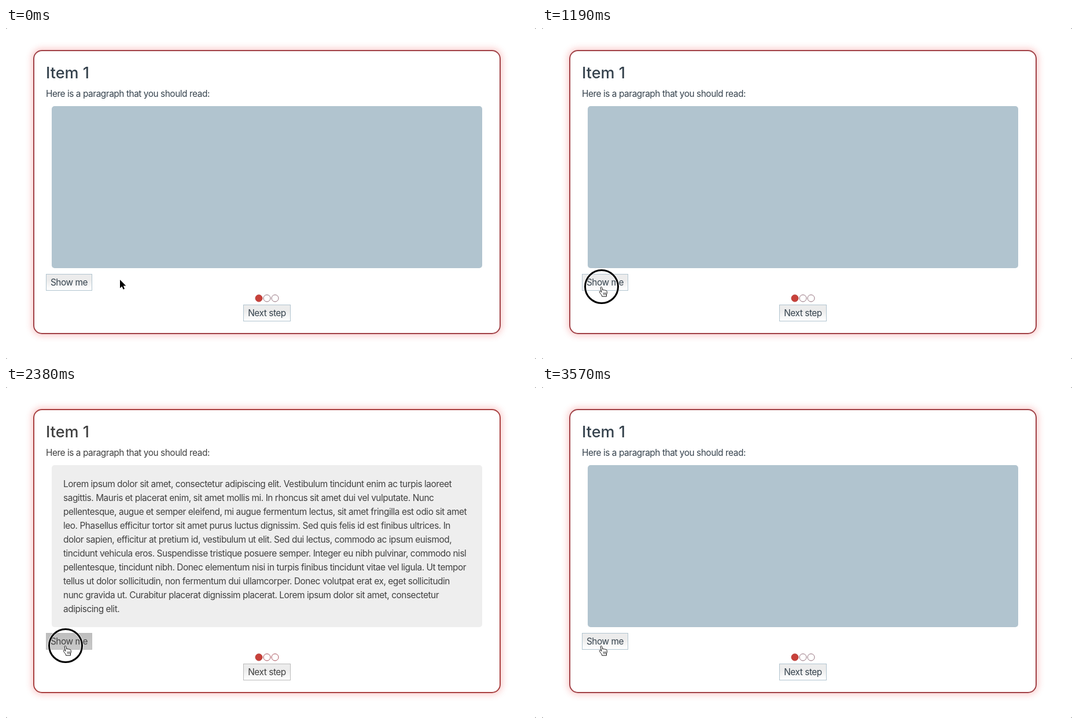
An HTML page that plays this animation: 916x572 px, repeating every 4.06 s.

```html
<!DOCTYPE html>
<html lang="en">
<head>
<meta charset="utf-8">
<title>Show me</title>
<style>
html, body { margin: 0; width: 100%; height: 100%; overflow: hidden; background: #fff; }
#stage {
  --ink: #35424d; --line: #b1c4cf; --edge: #a14146; --ring: #93707c; --panel: #b1c4cf;
  position: relative; width: 916px; height: 572px; overflow: hidden; background: #fff;
  font: 400 15.4px/24px Inter, Roboto, sans-serif; letter-spacing: -.445px; color: var(--ink);
}
#stage.open { --ink: #404040; --line: #bbb; --edge: #a94040; --ring: #a9505a; --panel: #eee; }
#stage > * { position: absolute; box-sizing: border-box; margin: 0; white-space: nowrap; }
.card {
  left: 47px; top: 38px; width: 808px; height: 491px; border: 2px solid var(--edge);
  border-radius: 15px; box-shadow: 0 0 11px 3px rgba(240, 60, 60, .25);
}
h3 { left: 69px; top: 61px; font-size: 27px; font-weight: 500; line-height: 34px; letter-spacing: 0; }
.intro { left: 69px; top: 102px; }
.panel {
  left: 79px; top: 135px; width: 744px; height: 280px; padding: 21px 20px;
  border-radius: 5px; background: var(--panel);
}
.panel span { visibility: hidden; white-space: pre; }
.open .panel span { visibility: visible; }
.button {
  height: 29px; line-height: 27px; text-align: center; border: 1px solid var(--line);
  background: linear-gradient(#ececec 35%, #fff);
}
.show { left: 69px; top: 425px; width: 80px; }
.open .show { background: linear-gradient(#bebebe, #c9c9c9); }
.next { left: 410px; top: 478px; width: 82px; }
svg { left: 0; top: 0; }
.dots circle { fill: #fff; stroke: var(--ring); }
.dots circle:first-child { fill: #c8413a; stroke: #b8403c; }
</style>
</head>
<body>
<div id="stage">
  <div class="card"></div>
  <h3>Item 1</h3>
  <p class="intro">Here is a paragraph that you should read:</p>
  <div class="panel"><span>Lorem ipsum dolor sit amet, consectetur adipiscing elit. Vestibulum tincidunt enim ac turpis laoreet
sagittis. Mauris et placerat enim, sit amet mollis mi. In rhoncus sit amet dui vel vulputate. Nunc
pellentesque, augue et semper eleifend, mi augue fermentum lectus, sit amet fringilla est odio sit amet
leo. Phasellus efficitur tortor sit amet purus luctus dignissim. Sed quis felis id est finibus ultrices. In
dolor sapien, efficitur at pretium id, vestibulum ut elit. Sed dui lectus, commodo ac ipsum euismod,
tincidunt vehicula eros. Suspendisse tristique posuere semper. Integer eu nibh pulvinar, commodo nisl
pellentesque, tincidunt nibh. Donec elementum nisi in turpis finibus tincidunt vitae vel ligula. Ut tempor
tellus ut dolor sollicitudin, non fermentum dui ullamcorper. Donec volutpat erat ex, eget sollicitudin
nunc gravida ut. Curabitur placerat dignissim placerat. Lorem ipsum dolor sit amet, consectetur
adipiscing elit.</span></div>
  <div class="button show">Show me</div>
  <div class="button next">Next step</div>
  <svg width="916" height="572" fill="none">
    <path d="M0 0H2L0 2ZM916 0H914L916 2ZM0 572H2L0 570ZM916 572H914L916 570Z" fill="#999"/>
    <g class="dots">
      <circle cx="437" cy="467" r="6"/>
      <circle cx="451" cy="467" r="6"/>
      <circle cx="465" cy="467" r="6"/>
    </g>
    <g id="click">
      <circle cx="103" cy="447" r="28.5" stroke="#fff" stroke-width="4.6"/>
      <circle cx="103" cy="447" r="28.5" stroke="#000" stroke-width="3"/>
    </g>
    <path id="arrow" d="M0 0V14.5L3.4 11.4L5.7 16.8L8 15.8L5.7 10.6H10.3Z"
      fill="#000" stroke="#fff" stroke-width="1.4" paint-order="stroke"/>
    <g id="hand" stroke="#111" stroke-linejoin="round" stroke-linecap="round">
      <path fill="#fff" d="M4.6 16.5C4.4 14.4 2.7 13 1.2 10.8C.2 9.3 0 8.3 .8 7.8
        C1.8 7.2 2.9 8.3 3.9 9.5L2.4 3C2 1.4 2.3 .6 3.1 .5C4 .3 4.6 1 4.9 2.2L5.9 6.2
        C6.1 5 8 5 8.4 6.4C8.9 5.4 10.4 5.6 10.9 6.9C11.6 6.2 12.9 6.6 13.2 8.2
        C13.7 10.5 13.3 12.4 12.4 14L12.5 16.5Z"/>
      <path stroke-width=".8" d="M7.1 10.6L7.6 13.8M9.2 10.5L9.5 13.8M11.2 10.4L11.3 13.8"/>
    </g>
  </svg>
</div>
<script>
const LOOP = 4060, STEP = 70;
const PRESS = 1120, OPEN = 1260, CLOSE = 3430, HAND = 770;

// Pointer tip, one point per step from zero
const path = [
  [197, 435], [194, 436], [186, 440], [174, 447], [160, 455], [145, 462], [129, 467],
  [114, 470], [103, 470], [100, 466], [100, 460], [101, 452], [103, 447]
];

const el = id => document.getElementById(id);
const stage = el('stage'), click = el('click'), arrow = el('arrow'), hand = el('hand');
const show = (node, on) => node.setAttribute('visibility', on ? 'visible' : 'hidden');
const place = (node, x, y) => node.setAttribute('transform', `translate(${x} ${y})`);

function draw(now) {
  const t = now % LOOP;
  const [x, y] = path[Math.min(Math.floor(t / STEP), path.length - 1)];
  stage.classList.toggle('open', t >= OPEN && t < CLOSE);
  show(click, t >= PRESS && t < CLOSE);
  show(arrow, t < HAND);
  show(hand, t >= HAND);
  place(arrow, x, y);
  place(hand, x - 4, y);
}

const start = performance.now();
function tick() {
  draw(performance.now() - start);
  requestAnimationFrame(tick);
}
tick();
</script>
</body>
</html>
```
